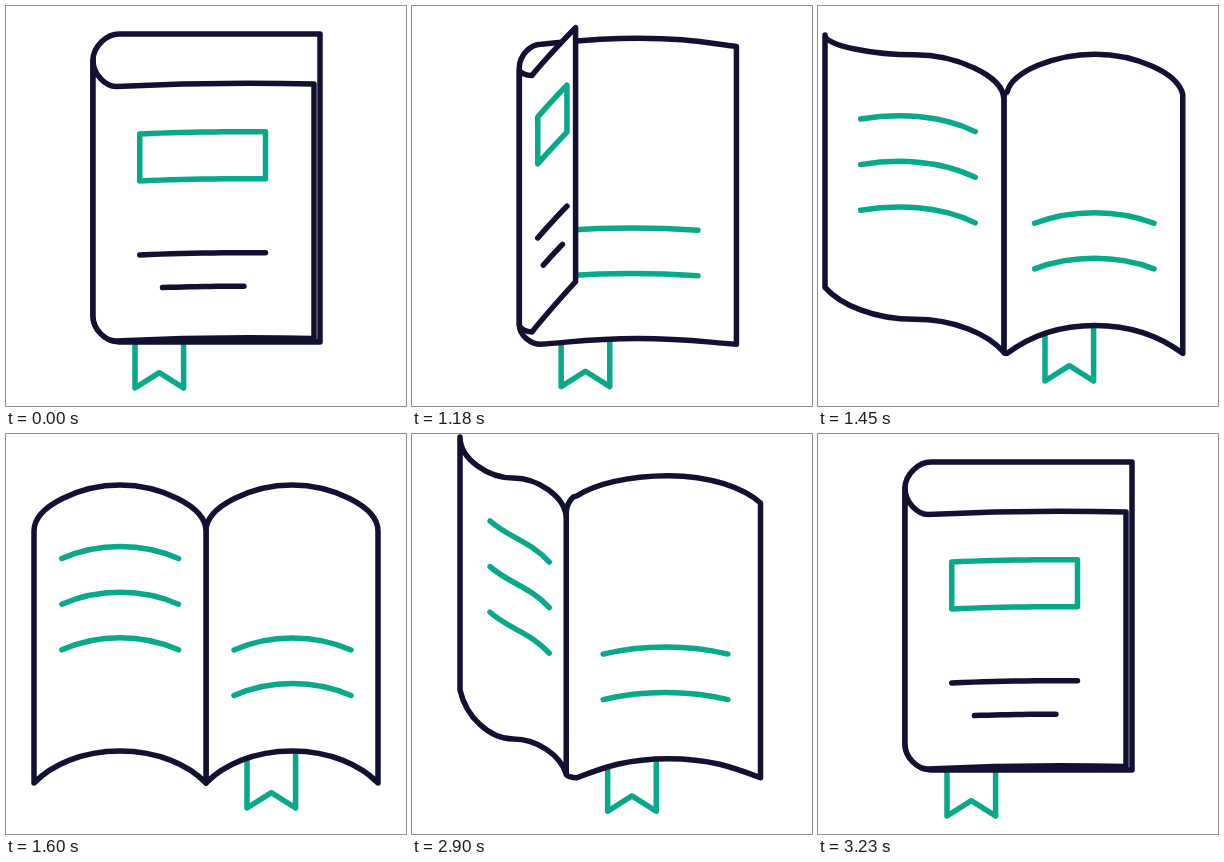
Animation of 400x400 px, one loop 3.26 s. Source, as an HTML page:

```html
<!DOCTYPE html>
<html lang="en">
<head>
<meta charset="utf-8">
<title>Book</title>
<style>
  html, body { margin: 0; width: 100%; height: 100%; overflow: hidden; background: #fff; }
  svg { display: block; width: 100vw; height: 100vh; }
  path { fill: none; stroke-width: 5.5; stroke-linecap: round; stroke-linejoin: round; }
  .ink { stroke: #121131; }
  .accent { stroke: #08a88a; }
  .paper { fill: #fff; }
</style>
</head>
<body>
<svg viewBox="0 0 400 400">
  <path id="ribbon" class="accent"/>
  <path id="page" class="ink paper"/>
  <path id="pageLines" class="accent"/>
  <path id="cover" class="ink paper"/>
  <path id="label" class="accent"/>
  <path id="titleLines" class="ink"/>
  <path id="innerLines" class="accent"/>
</svg>
<script>
const LOOP = 3260, STEP = 30, STEPS = 20, OPEN_AT = 1030, CLOSE_AT = 2660;
const HALF = .595;        // slide progress when the cover stands half open
const ROW = 45.6;         // distance between text lines

// path of the cover's free corner through a few points: step, x, y
const CORNER_KEYS = [[0, 308, 78], [1, 290, 69], [11, 48, 3], [15, 7, 29], [19, 25, 91], [20, 28, 97]];

const mix = (a, b, t) => a + (b - a) * t;
const mixPoint = (p, q, t) => [mix(p[0], q[0], t), mix(p[1], q[1], t)];
const easeInOut = t => t < .5 ? 2 * t * t : 1 - 2 * (1 - t) ** 2;
const byPose = (closed, half, open, u) =>
  u < HALF ? mix(closed, half, u / HALF) : mix(half, open, (u - HALF) / (1 - HALF));
const put = (id, d) => document.getElementById(id).setAttribute('d', d);

// smooth curve through keys of uneven spacing
function spline(keys, x, axis) {
  const rate = n => (keys[n + 1][axis] - keys[n][axis]) / (keys[n + 1][0] - keys[n][0]);
  const slope = n => {
    if (n === 0) return rate(0);
    if (n === keys.length - 1) return rate(n - 1);
    const before = keys[n][0] - keys[n - 1][0], after = keys[n + 1][0] - keys[n][0];
    return (before * rate(n) + after * rate(n - 1)) / (before + after);
  };
  let i = 0;
  while (i < keys.length - 2 && x > keys[i + 1][0]) i++;
  const h = keys[i + 1][0] - keys[i][0], t = (x - keys[i][0]) / h, s = 1 - t;
  return keys[i][axis] * (1 + 2 * t) * s * s + keys[i + 1][axis] * t * t * (3 - 2 * t)
    + h * t * s * (slope(i) * s - slope(i + 1) * t);
}

// quarter ellipse that leaves the end upright and meets the crest level; sharp leans the end inward
const quarter = (end, crest, sharp) => [
  end,
  [mix(end[0], crest[0], sharp), mix(end[1], crest[1], .55)],
  [mix(crest[0], end[0], .45), crest[1]],
  crest
];

// rolled fold at the spine, then a sheet that bows gently and turns into an arch
function coverEdge(spine, crest, corner, sharp, u) {
  const arch = quarter(corner, crest, sharp), curl = Math.min(1, u / HALF);
  const bow = Math.min(12, crest[1] - corner[1]);
  const flat = t => {
    const [x, y] = mixPoint(crest, corner, t);
    return [x, y - bow];
  };
  return [...quarter(spine, crest, sharp),
    mixPoint(flat(1 / 3), arch[2], curl), mixPoint(flat(2 / 3), arch[1], curl), corner];
}

const pageEdge = (spine, fold, crest, corner, sharp) => [
  ...quarter(spine, fold, 0),
  ...quarter(fold, crest, sharp).slice(1),
  ...quarter(corner, crest, sharp).reverse().slice(1)
];

const outline = (top, bottom) => {
  const back = [...bottom].reverse();
  return `M${top[0]}C${top.slice(1).join(' ')}L${back[0]}C${back.slice(1).join(' ')}Z`;
};

const bezier = (p, t) => [0, 1].map(i => {
  const s = 1 - t;
  return s ** 3 * p[0][i] + 3 * s * s * t * p[1][i] + 3 * s * t * t * p[2][i] + t ** 3 * p[3][i];
});
// part of a curve, moved down
const trace = (curve, from, to, drop) => Array.from({ length: 13 }, (_, i) => {
  const [x, y] = bezier(curve, mix(from, to, i / 12));
  return [x, y + drop];
});
const polyline = points => 'M' + points.join('L');

// text line whose middle is lifted by rise
const textLine = (x1, y1, x2, y2, rise) =>
  `M${x1} ${y1}C${mix(x1, x2, .31)} ${mix(y1, y2, .4) - rise} `
  + `${mix(x1, x2, .69)} ${mix(y1, y2, .5) - rise} ${x2} ${y2}`;

function drawPage(u, spineX, spineEnd) {
  const foldX = mix(113, 200, u), crestX = mix(213, 286, u), edgeX = mix(314, 372, u);
  const low = mix(336, 349, u), high = mix(28, 97, u);
  const top = pageEdge([spineX, mix(54, 97, u)], [foldX, byPose(28, 62, 97, u)],
    [crestX, mix(28, 51, u)], [edgeX, high], .45 * (1 - u));
  const bottom = pageEdge([spineX, spineEnd], [foldX, low],
    [crestX, mix(336, 317, u)], [edgeX, low], mix(.45, .2, u));
  put('page', outline(top, bottom));

  const left = mix(137, 228, u), right = mix(273, 345, u), y = mix(226, 216, u);
  put('pageLines', [0, 1].map(n =>
    textLine(left, y + n * ROW, right, y + n * ROW, 16 * u)).join(''));

  const ribbonX = mix(129, 241, u), ribbonY = mix(382, 374, u);
  put('ribbon', `M${ribbonX} 300V${ribbonY}l24.3 -15.3l24.3 15.3V300`);
}

function drawCover(u, spineX, spineEnd, x, y) {
  const crestX = mix(spineX, x, byPose(.104, .5, .5, u));
  const top = coverEdge([spineX, byPose(54, 85, 97, u)], [crestX, byPose(80.5, 44, 51, u)],
    [x, y], 0, u);
  const bottom = coverEdge([spineX, spineEnd], [crestX, byPose(335, 305, 317, u)],
    [x, y + mix(254.5, 252, u)], .2 * u, u);
  put('cover', outline(top, bottom));

  const front = x > spineX, face = top.slice(3);
  const wide = drop => trace(face, .12, .755, drop);
  put('label', front ? polyline([...wide(48.5), ...wide(95.5).reverse()]) + 'Z' : '');
  put('titleLines', front ? polyline(wide(169.5)) + polyline(trace(face, .235, .646, 203)) : '');

  const spread = Math.max(0, (u - HALF) / (1 - HALF));
  const outer = mix(spineX, x, mix(.717, .838, spread)), inner = mix(spineX, x, .16);
  const outerY = mix(87, 124.6, spread), innerY = mix(128, 124.6, spread);
  put('innerLines', front ? '' : [0, 1, 2].map(n =>
    textLine(outer, outerY + n * ROW, inner, innerY + n * ROW, 16 * spread)).join(''));
}

function draw(step) {
  const u = easeInOut(step / STEPS);
  const spineX = mix(87, 200, u), spineEnd = byPose(310, 340, 349, u);
  drawPage(u, spineX, spineEnd);
  drawCover(u, spineX, spineEnd, spline(CORNER_KEYS, step, 1), spline(CORNER_KEYS, step, 2));
}

const stepsSince = (t, start) => Math.max(0, Math.min(STEPS, Math.floor((t - start) / STEP) + 1));

const begin = performance.now();
function tick() {
  const t = (performance.now() - begin) % LOOP;
  draw(stepsSince(t, OPEN_AT) - stepsSince(t, CLOSE_AT));
  requestAnimationFrame(tick);
}
tick();
</script>
</body>
</html>
```
